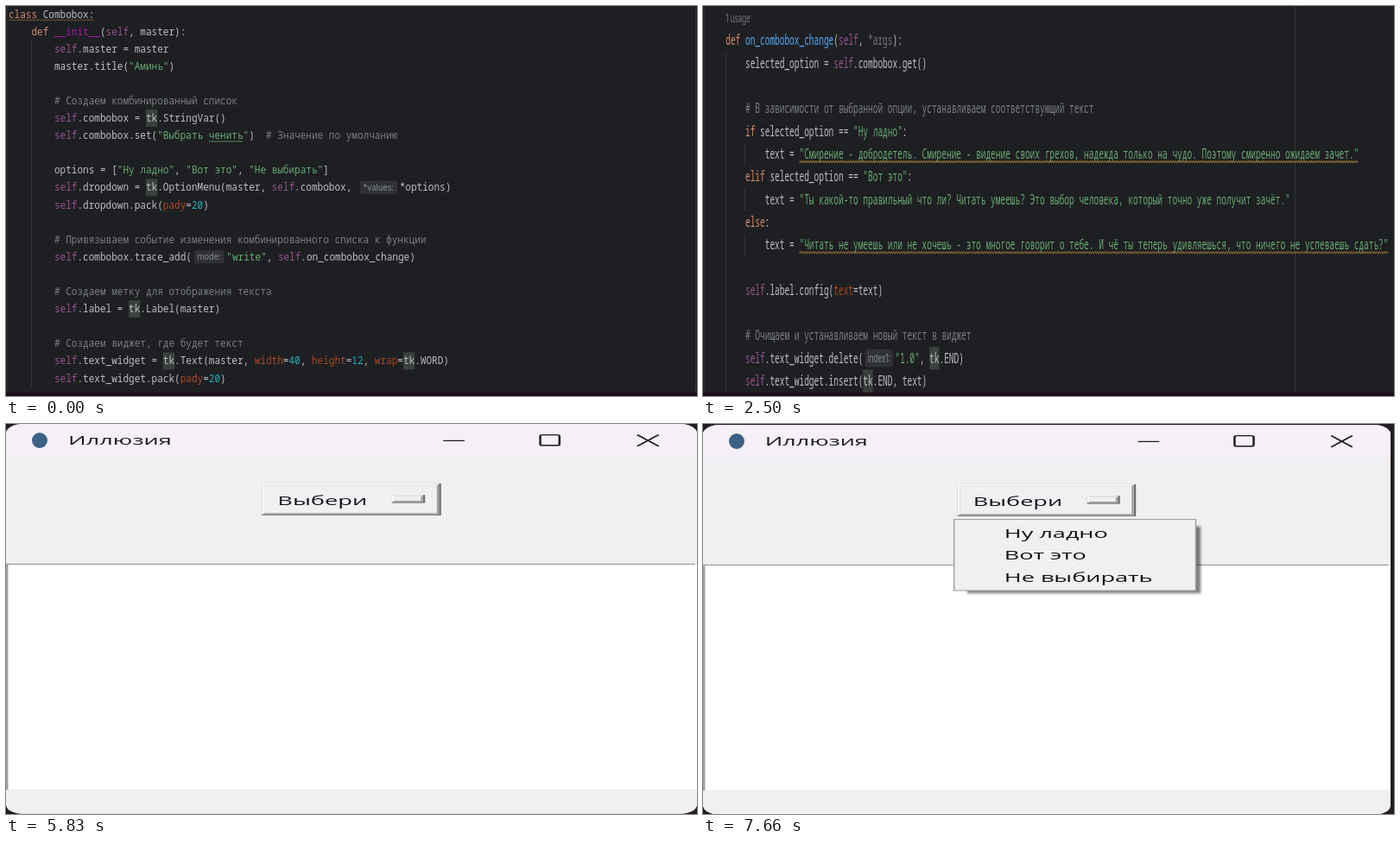
Animation of 800 by 452 pixels, one loop 8000 ms. Source, as an HTML page with a canvas:

```html
<!DOCTYPE html>
<html lang="ru">
<head>
<meta charset="utf-8">
<title>Combobox</title>
<style>
html, body { margin: 0; width: 100%; height: 100%; overflow: hidden; background: #1e1f22; }
canvas { display: block; width: 800px; height: 452px; }
</style>
</head>
<body>
<canvas id="stage" width="800" height="452"></canvas>
<script>
const ctx = document.getElementById('stage').getContext('2d');
const LOOP = 8000;

// Editor units before scaling: 13px monospace on 22px lines.
const CHAR = 7.8, LINE = 22, BASELINE = 15;
const CODE_FONT = '500 13px "Noto Sans Mono", monospace';
const HINT_FONT = '11px Inter, sans-serif';
const UI_FONT = '500 11px "Open Sans", "Noto Sans", sans-serif';

const COLORS = {
  plain: '#bcbec4', module: '#bcbec4', comment: '#7a7e85', string: '#6aab73',
  keyword: '#cf8e6d', self: '#94558d', dunder: '#a01ca0', func: '#56a8f5',
  unused: '#6f737a', kwarg: '#aa4926', number: '#2aacb8', hint: '#868a91'
};
const WARNING = '#94713a';
const TOKEN = /(?<comment>#.*)|(?<string>"[^"]*")|\{(?<hint>[^}]+)\}|(?<dunder>__\w+__)|(?<keyword>\b(?:class|def|if|elif|else)\b)|(?<self>\bself\b)|(?<func>on_combobox_change(?=\(self))|(?<unused>\*args)|(?<module>\btk\b)|(?<kwarg>\w+(?==\w))|(?<number>\b\d+\b)|(?<plain>\w+|[^\w\s])/g;

const constructorView = {
  x: 3, y: -0.2, sx: 0.849, sy: 0.9136,
  code: `class Combobox:
    def __init__(self, master):
        self.master = master
        master.title("Аминь")

        # Создаем комбинированный список
        self.combobox = tk.StringVar()
        self.combobox.set("Выбрать ченить")  # Значение по умолчанию

        options = ["Ну ладно", "Вот это", "Не выбирать"]
        self.dropdown = tk.OptionMenu(master, self.combobox, {*values:}*options)
        self.dropdown.pack(pady=20)

        # Привязываем событие изменения комбинированного списка к функции
        self.combobox.trace_add({mode:}"write", self.on_combobox_change)

        # Создаем метку для отображения текста
        self.label = tk.Label(master)

        # Создаем виджет, где будет текст
        self.text_widget = tk.Text(master, width=40, height=12, wrap=tk.WORD)
        self.text_widget.pack(pady=20)`,
  // [column, first row, row count]
  guides: [[4, 2, 20]],
  // [row, column, length, colour]
  squiggles: [[0, 0, 15, WARNING], [7, 35, 6, COLORS.string]]
};

const handlerView = {
  x: 3.5, y: 1.2, sx: 0.7286, sy: 1.1955, caption: '1 usage',
  code: `
    def on_combobox_change(self, *args):
        selected_option = self.combobox.get()

        # В зависимости от выбранной опции, устанавливаем соответствующий текст
        if selected_option == "Ну ладно":
            text = "Смирение - добродетель. Смирение - видение своих грехов, надежда только на чудо. Поэтому смиренно ожидаем зачет."
        elif selected_option == "Вот это":
            text = "Ты какой-то правильный что ли? Читать умеешь? Это выбор человека, который точно уже получит зачёт."
        else:
            text = "Читать не умеешь или не хочешь - это многое говорит о тебе. И чё ты теперь удивляешься, что ничего не успеваешь сдать?"

        self.label.config(text=text)

        # Очищаем и устанавливаем новый текст в виджет
        self.text_widget.delete({index1:}"1.0", tk.END)
        self.text_widget.insert(tk.END, text)`,
  guides: [[4, 2, 15], [8, 6, 1], [8, 8, 1], [8, 10, 1]],
  squiggles: [[6, 19, 114, WARNING], [10, 19, 120, WARNING]]
};

function rect(color, x, y, w, h) {
  ctx.fillStyle = color;
  ctx.fillRect(x, y, w, h);
}

function label(text, x, y, font, color) {
  ctx.font = font;
  ctx.fillStyle = color;
  ctx.fillText(text, x, y);
}

function strokePath(color, width, points) {
  ctx.strokeStyle = color;
  ctx.lineWidth = width;
  ctx.beginPath();
  points.forEach(([x, y]) => ctx.lineTo(x, y));
  ctx.stroke();
}

// Draws a parameter hint and returns the room it takes in the line.
function drawHint(text, x, y) {
  ctx.font = HINT_FONT;
  const width = ctx.measureText(text).width + 9;
  ctx.fillStyle = '#2f3135';
  ctx.beginPath();
  ctx.roundRect(x + 3, y - 13, width, 17, 4);
  ctx.fill();
  label(text, x + 7.5, y - 0.5, HINT_FONT, COLORS.hint);
  return width + 6;
}

function drawCodeLine(line, row) {
  const y = row * LINE + BASELINE;
  let shift = 0;
  for (const match of line.matchAll(TOKEN)) {
    const [kind, text] = Object.entries(match.groups).find(([, value]) => value);
    const x = match.index * CHAR + shift;
    if (kind === 'hint') {
      shift += drawHint(text, x, y) - match[0].length * CHAR;
      continue;
    }
    if (kind === 'module') rect('#3a403b', x, y - 15.5, 2 * CHAR, LINE);
    label(text, x, y, CODE_FONT, COLORS[kind]);
  }
}

function drawSquiggle([row, column, length, color]) {
  const x = column * CHAR, y = row * LINE + BASELINE + 3;
  const steps = Math.floor(length * CHAR / 2);
  const points = Array.from({ length: steps + 1 }, (_, i) => [x + i * 2, y + (i % 2 ? -1 : 1)]);
  strokePath(color, 0.9, points);
}

function drawEditor(view) {
  rect('#1e1f22', 0, 0, 800, 452);
  rect('#2b2d30', 1, 0, 1, 448);
  rect('#313438', Math.round(view.x + 120 * CHAR * view.sx), 0, 1, 448);
  for (const [column, row, count] of view.guides) {
    const top = view.y + row * LINE * view.sy;
    const height = Math.min(count * LINE * view.sy, 447 - top);
    rect('#313438', Math.floor(view.x + column * CHAR * view.sx), top, 1, height);
  }
  ctx.save();
  ctx.translate(view.x, view.y);
  ctx.scale(view.sx, view.sy);
  if (view.caption) label(view.caption, 4 * CHAR, BASELINE - 0.5, HINT_FONT, COLORS.unused);
  view.code.split('\n').forEach(drawCodeLine);
  view.squiggles.forEach(drawSquiggle);
  ctx.restore();
  rect('#1a0f18', 0, 448, 800, 4);
}

function raisedBox(x, y, w, h, border) {
  rect('#6d6d6d', x, y, w, h);
  rect('#ffffff', x, y, w - border / 2, h - border / 2);
  rect('#a0a0a0', x + border / 2, y + border / 2, w - border, h - border);
  rect('#f0f0f0', x + border / 2, y + border / 2, w - border * 1.5, h - border * 1.5);
}

function drawWindowControls() {
  const ink = '#1c1a1d';
  strokePath(ink, 1, [[205, 14.5], [215, 14.5]]);
  ctx.beginPath();
  ctx.roundRect(250.5, 9.5, 9, 9, 1);
  ctx.stroke();
  strokePath(ink, 1, [[296, 9.3], [306, 19.3]]);
  strokePath(ink, 1, [[306, 9.3], [296, 19.3]]);
}

function drawMenu() {
  ctx.save();
  ctx.filter = 'blur(1.5px)';
  rect('rgba(0, 0, 0, 0.5)', 124.5, 88, 110, 58);
  ctx.restore();
  rect('#a0a0a0', 118, 81.5, 114.5, 62.5);
  rect('#f0f0f0', 118.6, 82.3, 113.3, 60.9);
  ['Ну ладно', 'Вот это', 'Не выбирать'].forEach((item, i) =>
    label(item, 142, 97.8 + i * 19.1, UI_FONT, '#111111'));
}

// Window units before scaling: 324 by 338.
function drawWindow(sx, y, menuOpen) {
  rect('#241c22', 0, 0, 800, 452);
  ctx.save();
  ctx.translate(0, y);
  ctx.scale(sx, 1.337);
  ctx.beginPath();
  ctx.roundRect(0, 0, 324, 338, 8);
  ctx.clip();
  rect('#f0f0f0', 0, 0, 324, 338);
  rect('#f5f0f8', 0, 0, 324, 30.5);
  label('Иллюзия', 29.2, 18.3, UI_FONT, '#1c1a1d');
  drawWindowControls();

  raisedBox(120, 51.5, 84, 27.7, 2);
  label('Выбери', 127.3, 70, UI_FONT, '#111122');
  raisedBox(181, 61.5, 15.5, 7, 2);

  rect('#a0a0a0', 0, 121, 323, 196);
  rect('#ffffff', 1, 122, 323, 195);
  if (menuOpen) drawMenu();
  ctx.restore();

  // Plain icon in the title bar
  ctx.fillStyle = '#3d6285';
  ctx.beginPath();
  ctx.arc(39, 19 + y, 9, 0, Math.PI * 2);
  ctx.fill();
}

const scenes = [
  { until: 500, draw: () => drawEditor(constructorView) },
  { until: 3830, draw: () => drawEditor(handlerView) },
  { until: 7160, draw: () => drawWindow(800 / 324, 0, false) },
  { until: LOOP, draw: () => drawWindow(796 / 324, 1, true) }
];

const start = performance.now();
function render() {
  const time = (performance.now() - start) % LOOP;
  scenes.find(scene => time < scene.until).draw();
  requestAnimationFrame(render);
}
render();
</script>
</body>
</html>
```
